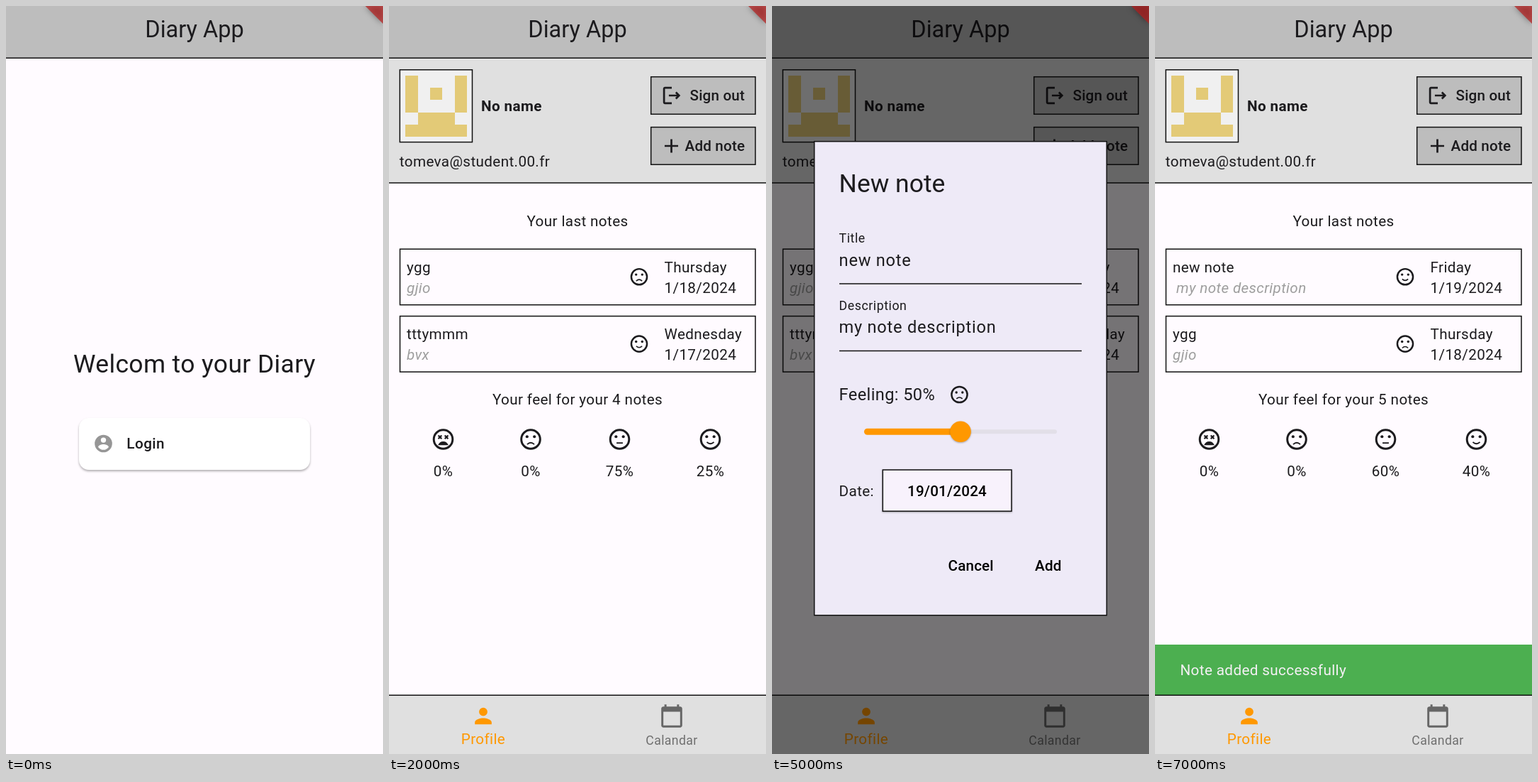
These frames come from a looping animation (532 by 1053 pixels, 8 s). An HTML page:

```html
<!DOCTYPE html>
<html lang="en">
<head>
<meta charset="utf-8">
<title>Diary App</title>
<style>
html, body { margin: 0; width: 100%; height: 100%; overflow: hidden; background: #fffbff; }
svg { display: block; width: 532px; height: 1053px; font-family: Roboto, sans-serif; }
.scene { visibility: hidden; animation: show 8s step-end infinite; }
.box { stroke: #111; stroke-width: 1.5; }
.card { fill: #fff; filter: drop-shadow(0 2px 1.5px rgba(0,0,0,.3)); }
.raised { filter: drop-shadow(0 1px 1px rgba(0,0,0,.3)); }
.banner { fill: #b71c1c; fill-opacity: .7; filter: drop-shadow(0 0 4px rgba(0,0,0,.6)); }
@keyframes show { 0% { visibility: visible; } 12.5%, 100% { visibility: hidden; } }
</style>
</head>
<body>
<svg id="stage" viewBox="0 0 532 1053"></svg>
<script>
const DP = 532 / 360;
const INK = '#1c1b1e', ORANGE = '#ff9800', PURPLE = '#6f43c0', MUTED = '#49454f';

const ICONS = {
  account: 'M12 2a10 10 0 1 0 0 20a10 10 0 1 0 0-20zm0 3a3 3 0 1 1 0 6a3 3 0 1 1 0-6zm0 14.2c-2.5 0-4.7-1.3-6-3.2c0-2 4-3.1 6-3.1s6 1.1 6 3.1c-1.3 1.9-3.5 3.2-6 3.2z',
  logout: 'M17 8l-1.4 1.4L17.2 11H9v2h8.2l-1.6 1.6L17 16l4-4zM5 5h7V3H5c-1.1 0-2 .9-2 2v14c0 1.1.9 2 2 2h7v-2H5z',
  add: 'M19 13h-6v6h-2v-6H5v-2h6V5h2v6h6z',
  person: 'M12 12a4 4 0 1 0 0-8a4 4 0 1 0 0 8zm0 2c-2.7 0-8 1.3-8 4v2h16v-2c0-2.7-5.3-4-8-4z',
  calendar: 'M20 3h-1V1h-2v2H7V1H5v2H4c-1.1 0-2 .9-2 2v16c0 1.1.9 2 2 2h16c1.1 0 2-.9 2-2V5c0-1.1-.9-2-2-2zm0 18H4V8h16z',
  edit: 'M14.1 9l.9.9L5.9 19H5v-.9zM17.7 3c-.3 0-.5.1-.7.3l-1.9 1.8 3.8 3.8 1.8-1.9c.4-.4.4-1 0-1.4l-2.3-2.3c-.2-.2-.4-.3-.7-.3zm-3.6 3.2L3 17.3V21h3.8L17.8 9.9z',
  left: 'M15.4 7.4L14 6l-6 6 6 6 1.4-1.4L10.8 12z',
  right: 'M8.6 7.4L10 6l6 6-6 6-1.4-1.4L13.2 12z',
  mic: 'M12 14c1.7 0 3-1.3 3-3V5a3 3 0 0 0-6 0v6c0 1.7 1.3 3 3 3zm5-3a5 5 0 0 1-10 0H5c0 3.5 2.6 6.4 6 6.9V21h2v-3.1c3.4-.5 6-3.4 6-6.9z'
};

const MOUTHS = {
  sad: '<path d="M8.6 16.8Q12 13.6 15.4 16.8"/>',
  flat: '<path d="M9 15.5h6"/>',
  happy: '<path d="M8.6 14.6Q12 17.8 15.4 14.6"/>',
  bad: `<path d="M7 17.5Q8.6 14 12 14T17 17.5z" fill="${INK}" stroke="none"/>`
};

// y is the middle of the capital letters; sizes and spacing are in dp
function text(x, y, str, { size = 14, ls = .25, fill = INK, weight = 400, mid, italic } = {}) {
  const px = size * DP;
  return `<text x="${x}" y="${y + px * .355}" font-size="${px}" letter-spacing="${ls * DP}" fill="${fill}" font-weight="${weight}"` +
    `${mid ? ' text-anchor="middle"' : ''}${italic ? ' font-style="italic"' : ''}>${str}</text>`;
}
const middle = (x, y, str, opt) => text(x, y, str, { mid: true, ...opt });
const label = (x, y, str, opt) => text(x, y, str, { weight: 500, ls: .1, ...opt });

const rect = (x, y, w, h, fill, rest = '') =>
  `<rect x="${x}" y="${y}" width="${w}" height="${h}" fill="${fill}" ${rest}/>`;
const box = (x, y, w, h, fill = 'none') => rect(x, y, w, h, fill, 'class="box"');
const line = (x1, x2, y, color = '#111', w = 1.5) =>
  `<path d="M${x1} ${y}H${x2}" stroke="${color}" stroke-width="${w}"/>`;
const circle = (x, y, r, fill, rest = '') => `<circle cx="${x}" cy="${y}" r="${r}" fill="${fill}" ${rest}/>`;
const place = (x, y, s) => `transform="translate(${x} ${y}) scale(${s}) translate(-12 -12)"`;
const icon = (name, x, y, fill, s = DP) =>
  `<path d="${ICONS[name]}" fill="${fill}" fill-rule="evenodd" ${place(x, y, s)}/>`;
const strokes = (d, color, w) =>
  `<path d="${d}" fill="none" stroke="${color}" stroke-width="${w}" stroke-linejoin="round"/>`;
const scrim = () => rect(0, 0, 532, 1053, '#000', 'opacity=".54"');

function face(mood, x, y, s = 20 * DP / 24) {
  const eyes = mood === 'bad'
    ? [8.9, 15.1].map(c => `<path d="M${c - 1.6} 8.3l3.2 3.2m0-3.2l-3.2 3.2" stroke-width="1.5"/>`).join('')
    : circle(8.5, 9.5, 1.4, INK, 'stroke="none"') + circle(15.5, 9.5, 1.4, INK, 'stroke="none"');
  return `<g fill="none" stroke="${INK}" stroke-width="1.25" ${place(x, y, s)}>` +
    circle(12, 12, 9, 'none', 'stroke-width="2"') + eyes + MOUTHS[mood] + '</g>';
}

const appBar = () => rect(0, 0, 532, 73, '#bdbdbd') + line(0, 532, 73.3) +
  middle(266, 32, 'Diary App', { size: 22, ls: 0 });

function loginCard(y, h, name) {
  const cy = y + h / 2 - .5;
  return rect(103, y, 326, h, '#fff', 'rx="14" class="card"') +
    icon('account', 137.5, cy, '#969696', 20 * DP / 24) + label(170.3, cy, name, { ls: .3 });
}

function welcome(titleY, cards) {
  return appBar() + middle(266, titleY, 'Welcom to your Diary', { size: 24 }) + cards;
}

function avatar() {
  const cell = 17.3;
  const blocks = [[0, 0, 1, 3], [4, 0, 1, 3], [2, 1, 1, 1], [1, 3, 3, 1], [0, 4, 5, 1]];
  return box(15.3, 89.8, 102.2, 101.8, '#f0f0f0') + blocks.map(([c, r, w, h]) =>
    rect(23.3 + c * cell, 97.6 + r * cell, w * cell, h * cell, '#e3ca77', 'shape-rendering="crispEdges"')).join('');
}

function note(y, { title, body, mood, day, date }) {
  return box(15.5, y, 501.5, 78.5) + text(25, y + 25, title) +
    text(body[0] === 'm' ? 30 : 25, y + 54.5, body, { fill: '#9e9e9e', italic: true }) +
    face(mood, 353, y + 39) + text(388.5, y + 25, day) + text(388.5, y + 54.5, date);
}

const NOTES = [
  { title: 'new note', body: 'my note description', mood: 'happy', day: 'Friday', date: '1/19/2024' },
  { title: 'ygg', body: 'gjio', mood: 'sad', day: 'Thursday', date: '1/18/2024' },
  { title: 'tttymmm', body: 'bvx', mood: 'happy', day: 'Wednesday', date: '1/17/2024' }
];

function profile(first, count, shares) {
  const moods = ['bad', 'sad', 'flat', 'happy'], xs = [76.5, 200, 325.5, 453.5];
  return appBar() + rect(0, 74, 532, 175, '#e0e0e0') + line(0, 532, 249) + avatar() +
    text(130, 141, 'No name', { weight: 700 }) + text(14.8, 219, 'tomeva@student.00.fr') +
    box(369.7, 99.7, 147.3, 52.6, '#bdbdbd') + icon('logout', 399, 126, INK, 1.36) + label(424.5, 126, 'Sign out') +
    box(369.7, 170.6, 147.3, 52.6, '#bdbdbd') + icon('add', 398.5, 197, INK, 1.36) + label(417.5, 197, 'Add note') +
    middle(266, 303, 'Your last notes') + note(342.2, NOTES[first]) + note(436.6, NOTES[first + 1]) +
    middle(266, 554, `Your feel for your ${count} notes`) +
    moods.map((m, i) => face(m, xs[i], 610, DP) + middle(xs[i], 655, shares[i] + '%')).join('') +
    rect(0, 970, 532, 83, '#e0e0e0') + line(0, 532, 970.3) +
    icon('person', 133, 999.5, ORANGE) + middle(133, 1032, 'Profile', { fill: ORANGE }) +
    icon('calendar', 399, 999.5, '#666') + middle(399, 1034, 'Calandar', { size: 12, fill: '#707070' });
}
const before = () => profile(1, 4, [0, 0, 75, 25]);

function noteDialog(top, height, percent, mood, short) {
  const thumb = 130.2 + 271.6 * percent / 100;
  const at = y => top + y;
  const date = short
    ? rect(156, at(462), 182, 13.5, '#f8f2fc') +
      strokes(`M156.3 ${at(475.5)}V${at(462)}H338V${at(475.5)}`, '#111', 1.5)
    : text(94.6, at(491.5), 'Date:') +
      `<g class="raised">${box(156.3, at(462.3), 181.7, 58.2, '#f8f2fc')}</g>` +
      middle(247, at(491.5), '19/01/2024', { weight: 500, ls: .1, fill: '#000' });
  const actions = top + height - 70;
  return box(59.7, top, 412.6, height, '#eeeaf7') +
    text(94.6, at(58.5), 'New note', { size: 24, ls: 0 }) +
    text(94.6, at(136), 'Title', { size: 12, ls: .375 }) +
    text(94.6, at(166.7), 'new note', { size: 16, ls: .5 }) + line(95, 437, at(200.2)) +
    text(94.6, at(230.7), 'Description', { size: 12, ls: .375 }) +
    text(94.6, at(261.3), 'my note description', { size: 16, ls: .5 }) + line(95, 437, at(294.8)) +
    text(94.6, at(356), `Feeling: ${percent}%`, { size: 16 }) + face(mood, 264.5, at(356.3)) +
    rect(130, at(405.5), 272, 6, '#e2dfe8', 'rx="3"') +
    rect(130, at(404), thumb - 130, 9, ORANGE, 'rx="4.5"') +
    circle(thumb, at(408.5), 14.8, ORANGE, 'class="raised"') + date +
    label(248.5, actions, 'Cancel', { fill: '#000' }) + label(371, actions, 'Add', { fill: '#000' });
}

function keyboard() {
  const PALE = '#e3e3e3', KEY = '#37383c', SIDE = '#474a49', PITCH = 52.65;
  const raw = (x, base, str, size, fill = PALE, weight = 400) =>
    `<text x="${x}" y="${base}" font-size="${size}" fill="${fill}" font-weight="${weight}" text-anchor="middle">${str}</text>`;
  const key = (x, y, w, fill = KEY, r = 8) => rect(x, y, w, 60, fill, `rx="${r}"`);
  const row = (letters, x, y) => [...letters].map((c, i) =>
    key(x + i * PITCH, y, 45) + raw(x + 22.5 + i * PITCH, y + 39, c, 33)).join('');
  const digits = [...'1234567890'].map((d, i) => raw(46.5 + i * PITCH, 774, d, 16, '#c4c7c5')).join('');
  const grid = [24, 36].map(x => [703, 715].map(y =>
    rect(x, y, 8.5, 8.5, 'none', `rx="2" stroke="${PALE}" stroke-width="2.6"`)).join('')).join('');
  const words = ['and', 'of', 'is'].map((w, i) => raw([128, 264, 401][i], 722, w, 27.5)).join('');
  return rect(0, 681, 532, 372, '#1f1f1f') +
    circle(34, 713, 25.3, KEY) + grid + words + strokes('M193 695V731M337 695V731', '#444746', 1.3) +
    circle(498, 713, 25.3, KEY) + icon('mic', 498, 713, PALE, 1.5) +
    row('azertyuiop', 6.5, 757) + digits + row('qsdfghjklm', 6.5, 831.5) + row("wxcvbn'", 85.2, 906) +
    key(6.5, 906, 71.5, SIDE) + strokes('M42 922L58 938H50V949H34V938H26z', PALE, 2.6) +
    key(453, 906, 72.5, SIDE) +
    strokes('M482 925H506V949H482L472 937zM486 931l12 12m0-12l-12 12', PALE, 2.6) +
    key(6.5, 981, 71.5, SIDE, 30) + raw(42, 1018, '?123', 20.5, PALE, 500) +
    key(85.2, 981, 45, SIDE) + circle(107.7, 998.5, 7, 'none', `stroke="${PALE}" stroke-width="1.6"`) +
    circle(105, 996.5, 1.2, PALE) + circle(110.4, 996.5, 1.2, PALE) +
    strokes('M104 1000.5Q107.7 1005 111.4 1000.5', PALE, 1.5) + raw(107.7, 1022, ',', 28) +
    key(137.8, 981, 45) + circle(160.3, 1011, 13.5, 'none', `stroke="${PALE}" stroke-width="2.4"`) +
    `<ellipse cx="160.3" cy="1011" rx="6" ry="13.5" fill="none" stroke="${PALE}" stroke-width="2.2"/>` +
    strokes('M148 1006.5H172.6M148 1015.5H172.6', PALE, 2.2) +
    key(190, 981, 203.5) + raw(291.8, 1018, 'FR • EN', 19, '#d0d2d0') +
    key(401, 981, 45, SIDE) + raw(423.5, 1022, '.', 28) +
    key(453, 981, 72.5, '#a8c7fa', 30) + strokes('M477 1012L485.5 1020.5L502 1003', '#062e6f', 2.8);
}

function datePicker() {
  const big = { size: 16, ls: .5, fill: '#1b1a1f' };
  const col = c => 68.4 + 65.9 * c;
  const heads = [...'SMTWTFS'].map((d, c) => middle(col(c), 430.5, d, big)).join('');
  let days = circle(397.7, 613, 30.4, PURPLE) +
    circle(463.6, 613, 29.8, 'none', `stroke="${PURPLE}" stroke-width="1.5"`);
  for (let d = 1; d <= 31; d++) {
    const fill = d === 19 ? '#fff' : d === 20 ? PURPLE : big.fill;
    days += middle(col(d % 7), 491 + 60.7 * Math.floor(d / 7), d, { ...big, fill });
  }
  return rect(24, 147, 484.5, 755, '#eee6f6', 'rx="41"') +
    label(59, 185.5, 'Select date', { fill: MUTED }) +
    text(59, 271, 'Fri, Jan 19', { size: 32, ls: 0, fill: MUTED }) + icon('edit', 455, 271, MUTED) +
    line(24, 508.5, 322.7, '#cac4d0') +
    label(59, 362.5, 'January 2024', { fill: '#76717b' }) + '<path d="M197.8 359h15l-7.5 7.7z" fill="#76717b"/>' +
    icon('left', 396, 362.5, '#6a6570') + icon('right', 467, 362.5, '#6a6570') + heads + days +
    label(308, 864, 'Cancel', { fill: PURPLE }) + label(435, 864, 'OK', { fill: PURPLE });
}

const snackBar = () => rect(0, 899, 532, 71, '#4caf50') +
  text(35.5, 935, 'Note added successfully', { fill: '#f4f0f4' }) + line(0, 532, 970.3);

const scenes = [
  welcome(503, loginCard(580, 73, 'Login')),
  welcome(472, loginCard(549, 61, 'Login') + loginCard(623, 61, 'Sign up')),
  before(),
  before() + scrim() + noteDialog(27.5, 616.5, 50, 'sad', true) + keyboard(),
  before() + scrim() + scrim() + datePicker(),
  before() + scrim() + noteDialog(190.7, 667, 50, 'sad'),
  before() + scrim() + noteDialog(190.7, 667, 87, 'happy'),
  profile(0, 5, [0, 0, 60, 40]) + snackBar()
];

document.getElementById('stage').innerHTML = rect(0, 0, 532, 1053, '#fffbff') +
  scenes.map((body, i) => `<g class="scene" style="animation-delay:${i ? i - 8 : 0}s">${body}` +
    '<path class="banner" d="M507 0H532V25z"/></g>').join('');
</script>
</body>
</html>
```
